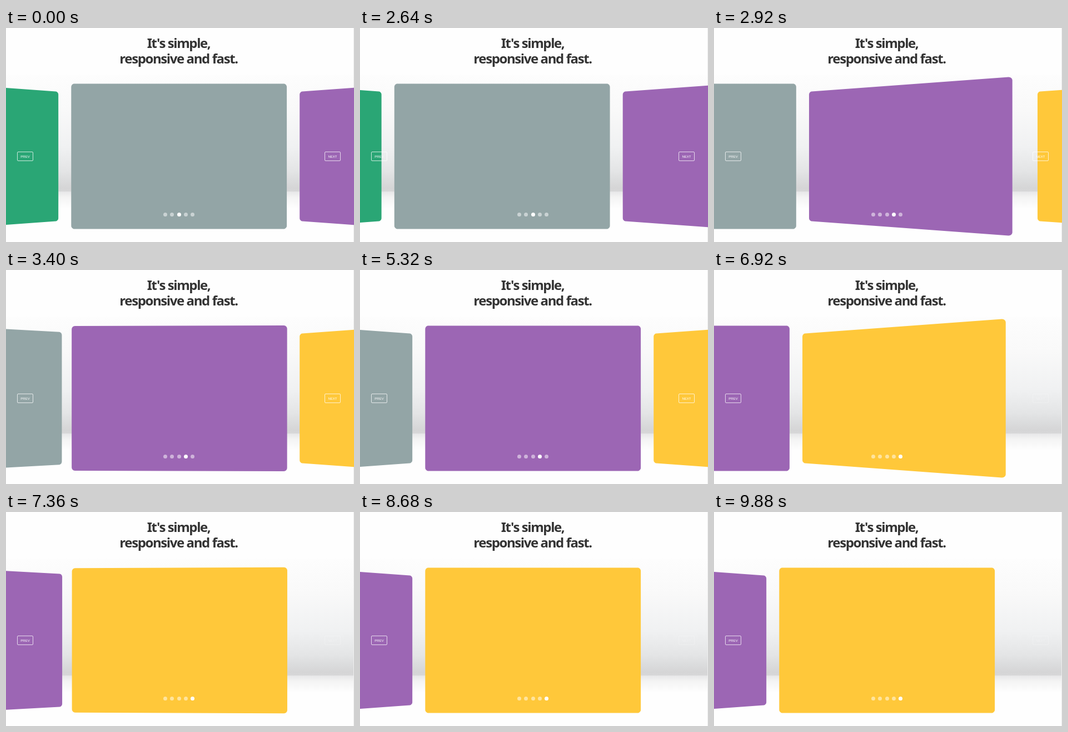
An HTML page with a canvas for the animation above (9.92 s loop, 626 by 386 pixels).

```html
<!DOCTYPE html>
<html lang="en">
<head>
<meta charset="utf-8">
<title>Carousel</title>
<style>
  html, body { margin: 0; width: 100%; height: 100%; overflow: hidden; background: #fff; }
  #stage { position: relative; width: 626px; height: 386px; overflow: hidden; background: #fefefe; }
  #stage > * { position: absolute; }
  canvas { left: 0; top: 0; }
  h1 {
    left: 0; top: 13px; width: 621px; margin: 0; text-align: center; color: #333;
    font: 600 24px/28px "Noto Sans", "Open Sans", sans-serif; letter-spacing: -1.4px;
  }
  .wall {
    left: 0; top: 84px; width: 625px; height: 211px;
    background: linear-gradient(#fdfdfd, #f9f9f9 30%, #f0f1f2 62%, #e4e5e6 82%, #d5d5d6 97%, #d8d8d9);
  }
  .floor { left: 0; top: 295px; width: 625px; height: 30px; background: linear-gradient(#e7e7e8, #f4f4f4 35%, #fefefe); }
  .edge { left: 625px; top: 0; width: 1px; height: 386px; background: #ececec; }
  .button {
    top: 223px; width: 27px; height: 15px; border: 1px solid rgba(255, 255, 255, .75); border-radius: 2px;
    color: #fff; text-align: center; font: 6px/16px "Liberation Sans", Arial, sans-serif;
  }
  .dot { top: 333px; width: 7px; height: 7px; border-radius: 50%; background: #fff; }
</style>
</head>
<body>
<div id="stage">
  <div class="wall"></div>
  <div class="floor"></div>
  <div class="edge"></div>
  <canvas width="626" height="386"></canvas>
  <h1>It's simple,<br>responsive and fast.</h1>
</div>
<script>
const LOOP = 9920, PITCH = 411, INSET = 30;
const CENTER_X = 311.2, CENTER_Y = 231.5, HALF_W = 193.9, HALF_H = 131.1, RADIUS = 6;
const TILT = 18 * Math.PI / 180, DEPTH = 11, PERSPECTIVE = 569;
const COLORS = ['#2aa675', '#93a5a6', '#9c66b4', '#ffc83a'];
// Each drag lasts until the release, when the cards start to turn.
const RELEASES = [3060, 7040];
const DRAG = [[-580, 0], [-420, 55], [-120, 369], [0, 380], [260, PITCH]];

const stage = document.getElementById('stage');
const ctx = stage.querySelector('canvas').getContext('2d');
function add(className, left, text = '') {
  const el = document.createElement('div');
  el.className = className;
  el.textContent = text;
  el.style.left = left + 'px';
  return stage.appendChild(el);
}

add('button', 20, 'PREV');
const next = add('button', 573, 'NEXT');
const dots = Array.from({ length: 5 }, (_, i) => add('dot', 283.2 + i * 12.25));

const clamp = v => Math.min(1, Math.max(0, v));
const easeOut = v => 1 - (1 - clamp(v)) ** 2;
const smooth = v => v * v * (3 - 2 * v);

function dragAt(t) {
  if (t <= DRAG[0][0]) return 0;
  for (let i = 1; i < DRAG.length; i++) {
    const [t0, x0] = DRAG[i - 1], [t1, x1] = DRAG[i];
    if (t < t1) {
      const u = (t - t0) / (t1 - t0);
      const ease = i === 1 ? u * u : i === 2 ? (u + smooth(u)) / 2 : easeOut(u);
      return x0 + (x1 - x0) * ease;
    }
  }
  return PITCH;
}

// Side runs from 1 (right) through 0 (front) to -1 (left).
function sideOf(index, t) {
  if (index === 0) return -1;
  const arrive = index > 1 ? easeOut((t - RELEASES[index - 2]) / 420) : 1;
  const leave = index < 3 ? easeOut((t - RELEASES[index - 1]) / 640) : 0;
  return 1 - arrive - leave;
}

// Rounded card turned about its vertical axis and seen in perspective.
function drawCard(centerX, side, color) {
  const angle = TILT * side, depth = DEPTH * Math.abs(side);
  const project = (x, y) => {
    const scale = PERSPECTIVE / (PERSPECTIVE + depth - x * Math.sin(-angle) * -1);
    return [centerX + x * Math.cos(angle) * scale, CENTER_Y + y * scale];
  };
  const inX = HALF_W - RADIUS, inY = HALF_H - RADIUS;
  ctx.beginPath();
  for (let corner = 0; corner < 4; corner++) {
    for (let step = 0; step <= 6; step++) {
      const a = (corner + step / 6) * Math.PI / 2;
      const signX = corner === 0 || corner === 3 ? 1 : -1, signY = corner < 2 ? 1 : -1;
      ctx.lineTo(...project(signX * inX + RADIUS * Math.cos(a), signY * inY + RADIUS * Math.sin(a)));
    }
  }
  ctx.fillStyle = color;
  ctx.fill();
}

function draw(t) {
  const moves = RELEASES.map(release => dragAt(t - release));
  const scroll = moves[0] + moves[1];
  ctx.clearRect(0, 0, 626, 386);
  COLORS.forEach((color, i) => {
    const side = sideOf(i, t);
    const inset = side < 0 ? 1 - (1 + side) ** 2.2 : -(side ** 2.2);
    drawCard(CENTER_X + (i - 1) * PITCH - scroll + INSET * inset, side, color);
  });
  const active = 2 + moves.filter(m => m > PITCH / 2).length;
  dots.forEach((dot, i) => dot.style.opacity = i === active ? 1 : .5);
  next.style.opacity = active === 4 ? .3 : 1;
}

const start = performance.now();
function tick() {
  draw((performance.now() - start) % LOOP);
  requestAnimationFrame(tick);
}
tick();
</script>
</body>
</html>
```
